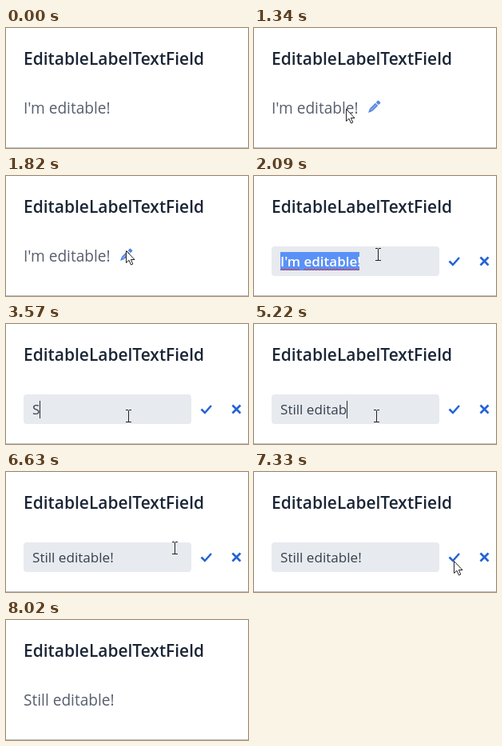
Animation, 303 px wide and 150 px high, one loop 9.55 s. Source, as an HTML page with a canvas:

```html
<!DOCTYPE html>
<html lang="en">
<head>
<meta charset="utf-8">
<title>Editable label</title>
<style>
  html, body { margin: 0; width: 100%; height: 100%; overflow: hidden; background: #fff; }
  canvas { display: block; width: 303px; height: 150px; }
</style>
</head>
<body>
<canvas id="stage"></canvas>
<script>
const W = 303, H = 150, LOOP = 9550, TICK = 70;
const FONT = '"Open Sans", "Noto Sans", sans-serif';
const BLUE = '#2463d5', PENCIL = '#5686df';
const HOVER = 730, OPEN = 1900, TYPE = 3570, KEY_GAP = 145, LAST_KEY = 5890, BLUR = 6560, COMMIT = 7400;
const OLD = "I'm editable!", NEW = 'Still editable!';

// Each stroke follows a quadratic curve, one step per tick.
const STROKES = [
  { start: 520, ticks: 6, from: [122, 146], bend: [98, 104], to: [115, 101] },
  { start: 1340, ticks: 10, from: [115, 101], bend: [158, 86], to: [155, 98] },
  { start: 2360, ticks: 5, from: [150, 99], bend: [106, 106], to: [153, 115] },
  { start: 6420, ticks: 5, from: [157, 113], bend: [200, 78], to: [250, 111] },
  { start: 7600, ticks: 6, from: [251, 114], bend: [262, 124], to: [270, 151] }
];

const canvas = document.getElementById('stage');
const ctx = canvas.getContext('2d');
const ratio = window.devicePixelRatio || 1;
canvas.width = W * ratio;
canvas.height = H * ratio;

function text(str, x, y, size, weight, color) {
  ctx.font = `${weight} ${size}px ${FONT}`;
  ctx.fillStyle = color;
  ctx.fillText(str, x, y);
  return ctx.measureText(str).width;
}

function rect(x, y, w, h, color, radius = 0) {
  ctx.fillStyle = color;
  ctx.beginPath();
  ctx.roundRect(x, y, w, h, radius);
  ctx.fill();
}

function trace(points) {
  ctx.beginPath();
  points.forEach(([x, y]) => ctx.lineTo(x, y));
}

function line(points, color, width) {
  trace(points);
  ctx.strokeStyle = color;
  ctx.lineWidth = width;
  ctx.stroke();
}

function pointerAt(t) {
  const stroke = STROKES.findLast(s => s.start <= t);
  if (!stroke) return null;
  const { start, ticks, from, bend, to } = stroke;
  const p = Math.min(1, Math.floor((t - start) / TICK) / ticks), q = 1 - p;
  return from.map((a, i) => Math.round(q * q * a + 2 * p * q * bend[i] + p * p * to[i]));
}

function arrow(x, y) {
  ctx.save();
  ctx.translate(x + 0.5, y + 0.5);
  trace([[0, 0], [0, 15], [3.5, 11.8], [6, 17.5], [8.3, 16.5], [5.9, 11], [10.5, 11]]);
  ctx.closePath();
  ctx.fillStyle = '#fff';
  ctx.fill();
  ctx.strokeStyle = '#222';
  ctx.lineWidth = 1;
  ctx.stroke();
  ctx.restore();
}

function beam(x, y) {
  rect(x, y - 7, 1, 15, '#222');
  for (const top of [y - 8, y + 7]) {
    rect(x - 3, top, 3, 1, '#222');
    rect(x + 1, top, 3, 1, '#222');
  }
}

function pencil() {
  ctx.save();
  ctx.translate(143, 106);
  ctx.rotate(-Math.PI / 4);
  trace([[0, 0], [5, -2.3], [5, 2.3]]);
  ctx.fillStyle = PENCIL;
  ctx.fill();
  rect(5, -2.3, 10, 4.6, PENCIL);
  rect(16, -2.3, 4, 4.6, PENCIL, 1);
  rect(5, -0.4, 9, 0.8, '#a9c4f5');
  ctx.restore();
}

function squiggle(from, to) {
  const points = [];
  for (let x = from; x <= to; x++) points.push([x, 117 + Math.cos((x - from) * Math.PI / 2)]);
  line(points, '#e0303c', 1);
}

function typedAt(t) {
  if (t < TYPE) return 0;
  if (t >= LAST_KEY) return NEW.length;
  return Math.min(NEW.length - 1, 1 + Math.floor((t - TYPE) / KEY_GAP));
}

function editor(t) {
  rect(22, 88, 210, 37, '#e7eaee', 4);
  const typed = typedAt(t);
  if (typed) {
    const width = text(NEW.slice(0, typed), 33, 113, 17.1, 500, '#35404e');
    if (t < BLUR) rect(Math.floor(33 + width), 96, 1, 22, '#222c38');
  } else {
    rect(33, 95, 99, 23, '#5a91f7');
    text(OLD, 33, 113, 17, 600, '#fff');
    squiggle(33, 57);
    squiggle(62, 132);
  }
  line([[244.5, 106.5], [249, 111], [257, 102]], BLUE, 2.5);
  line([[283.5, 101.5], [293.5, 111.5]], BLUE, 2.6);
  line([[293.5, 101.5], [283.5, 111.5]], BLUE, 2.6);
}

function draw(t) {
  ctx.setTransform(ratio, 0, 0, ratio, 0, 0);
  rect(0, 0, W, H, '#fff');
  rect(0, 149, W, 1, '#bdbdbd');
  text('EditableLabelTextField', 22, 46, 20.95, 600, '#1a2535');

  const editing = t >= OPEN && t < COMMIT;
  if (editing) editor(t);
  else text(t < OPEN ? OLD : NEW, 22, 107, 19.1, 400, '#565f6d');
  if (t >= HOVER && t < OPEN) pencil();

  const pos = pointerAt(t);
  if (pos) {
    const inField = editing && pos[0] < 232;
    (inField ? beam : arrow)(...pos);
  }
}

function frame(now) {
  draw(now % LOOP);
  requestAnimationFrame(frame);
}
requestAnimationFrame(frame);
</script>
</body>
</html>
```
